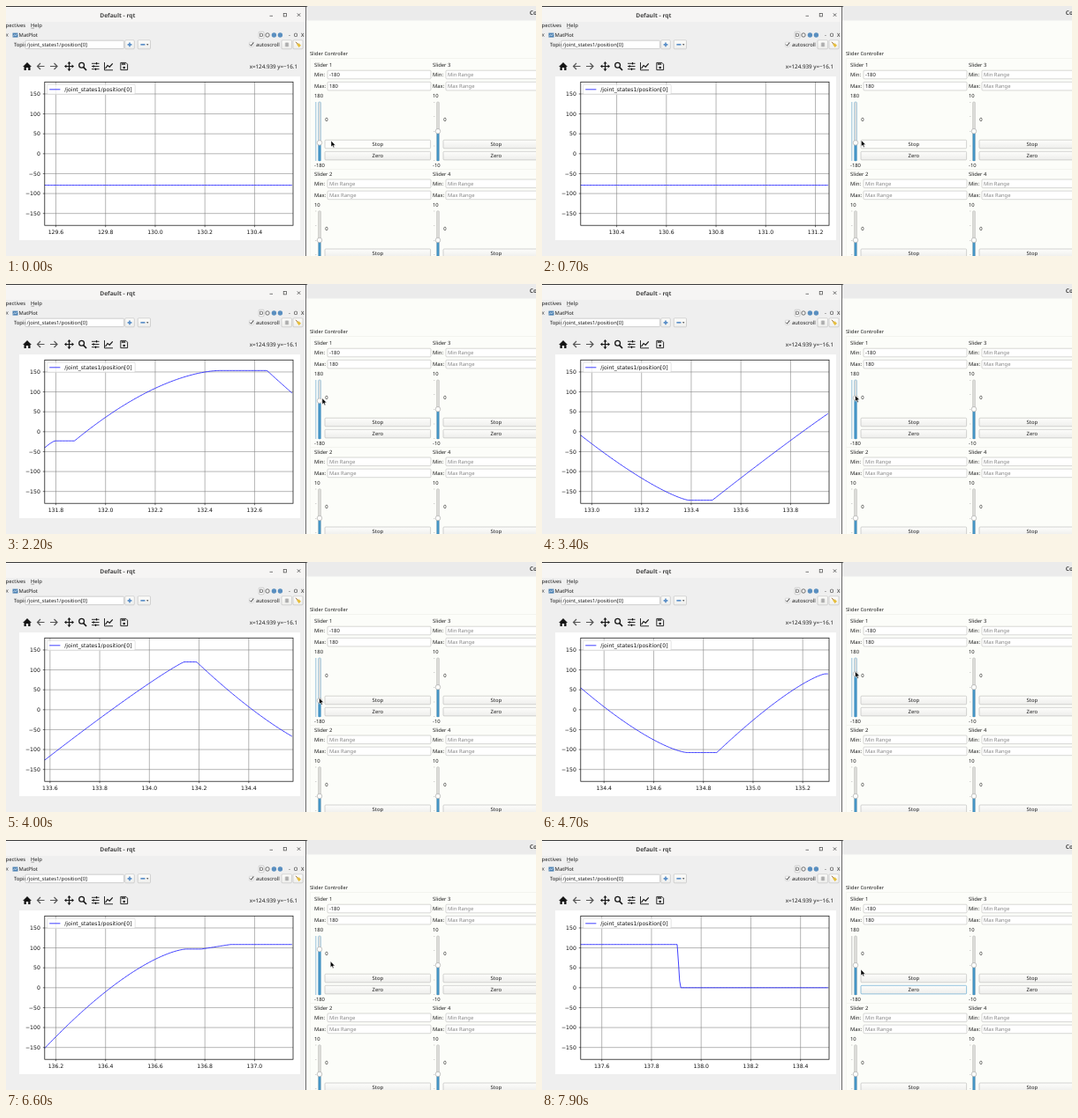
Write an HTML page that moves like this. It is 600x284 px and loops after 8000 ms.

```html
<!DOCTYPE html>
<html lang="en">
<head>
<meta charset="utf-8">
<title>Joint slider plot</title>
<style>
html, body { margin: 0; width: 100%; height: 100%; overflow: hidden; background: #efefef; }
svg { display: block; width: 600px; height: 284px; }
text { font: 5.85px "Noto Sans", "Open Sans", sans-serif; fill: #1c1c1c; text-rendering: geometricPrecision; white-space: pre; }
text.plot { font: 6.15px "DejaVu Sans", sans-serif; fill: #111; }
text.hint { fill: #858585; }
text.title { font-weight: 700; font-size: 6.6px; fill: #444; }
</style>
</head>
<body>
<svg id="stage" viewBox="0 0 600 284" xmlns="http://www.w3.org/2000/svg"></svg>
<script>
const stage = document.getElementById("stage");
const LOOP = 8000, STEP = 100;
const plot = { left: 43.8, right: 325, top: 86.3, bottom: 249.2, zero: 167.8, perUnit: 0.4525, perSecond: 281.2 };
const START = 130.555;      // plot time at the right edge when the loop begins
const LAG = 0.07;           // the plot trails the slider by this many seconds
const GRAB = 1, RELEASE = 6.3, PRESS_ZERO = 7.3;
const BLUE = "#1f1fff", GRID = "#858585", SLIDER = "#4595c6";

// Slider strokes in plot time; the position holds between them
const REST = -79;
const strokes = [
  { from: 131.693, to: 131.797, value: -23, ease: 1.3 },
  { from: 131.875, to: 132.46, value: 153.5, ease: 1.7 },
  { from: 132.65, to: 133.39, value: -172, ease: 1.3 },
  { from: 133.485, to: 134.14, value: 120, ease: 1.1 },
  { from: 134.19, to: 134.733, value: -107.5, ease: 1.4 },
  { from: 134.854, to: 135.29, value: 90, ease: 1.3 },
  { from: 135.42, to: 136.03, value: -172, ease: 1.2 },
  { from: 136.125, to: 136.725, value: 97, ease: 1.5 },
  { from: 136.786, to: 136.903, value: 108.5, ease: 1 },
  { from: 137.904, to: 137.915, value: 0, ease: 1 }
];
const drift = [[0, 0], [3.4, 0], [4.7, .051], [6.6, 0], [7.9, .06]];
const mouse = [
  [0, 368, 153], [.4, 368, 153], [.9, 357, 152], [2.2, 358, 128], [2.8, 354.5, 128], [RELEASE, 354.5, 121],
  [6.6, 367.3, 137.7], [7.1, 372, 169], [7.5, 372, 169], [7.9, 361, 147]
];

function position(time) {
  let value = REST;
  for (const s of strokes) {
    if (time <= s.from) break;
    const u = Math.min(1, (time - s.from) / (s.to - s.from));
    value += (s.value - value) * (1 - (1 - u) ** s.ease);
  }
  return value;
}

function along(keys, t, column = 1) {
  const i = keys.findIndex(key => key[0] >= t);
  if (i < 1) return keys[i < 0 ? keys.length - 1 : 0][column];
  const a = keys[i - 1], b = keys[i];
  return a[column] + (b[column] - a[column]) * (t - a[0]) / (b[0] - a[0]);
}

// Markup helpers
const attrs = o => Object.entries(o).map(([k, v]) => ` ${k}="${v}"`).join("");
const rect = (x, y, width, height, fill, more = {}) => `<rect${attrs({ x, y, width, height, fill, ...more })}/>`;
const path = (d, stroke, more = {}) => `<path${attrs({ d, fill: "none", stroke, "stroke-width": 1, ...more })}/>`;
const shape = (d, fill) => path(d, "none", { fill });
const circle = (cx, cy, r, fill, more = {}) => `<circle${attrs({ cx, cy, r, fill, ...more })}/>`;
const text = (x, y, s, more = {}) => `<text${attrs({ x, y, ...more })}>${s}</text>`;
const middle = { "text-anchor": "middle" }, end = { "text-anchor": "end" };
const thin = { "stroke-width": .6 };
const outlined = (stroke, rx = 1) => ({ stroke, rx, "stroke-width": .6 });

const field = (x, y, s, cls) =>
  rect(x, y, 117, 9.6, "#fff", outlined("#bdbdba")) + text(x + 1.9, y + 6.9, s, { class: cls });
const button = (x, y, s, id) =>
  rect(x, y, 119.6, 9.6, "url(#face)", { ...outlined("#b8b8b5"), id }) + text(x + 59.8, y + 6.9, s, middle);

function sliderPanel(n, x, y, limit, filled) {
  const gx = x + 6, gy = y + 47, cls = filled ? "" : "hint";
  return text(x, y + 7, "Slider " + n)
    + text(x, y + 18.3, "Min:") + text(x, y + 31.3, "Max:")
    + field(x + 15, y + 11.2, filled ? "-" + limit : "Min Range", cls)
    + field(x + 15, y + 24.3, filled ? limit : "Max Range", cls)
    + text(x, y + 41.9, limit) + text(x, y + 120.9, "-" + limit) + text(x + 12.3, y + 69.2, "0")
    + path(`M${gx - 4.3} ${gy}v67`, "#adadad", { "stroke-width": 1.5, "stroke-dasharray": filled ? ".6 .6" : ".5 16.1", id: "ticks" + n })
    + rect(gx - 1.4, gy, 2.8, 67, "#dededb", { ...outlined("#bcbcb9"), id: "groove" + n })
    + rect(gx - 1.4, gy + 33, 2.8, 34, SLIDER, { id: "fill" + n })
    + circle(gx, gy + 33.2, 2.8, "#fcfcfa", { stroke: "#a3a3a3", "stroke-width": .6, id: "knob" + n })
    + button(x + 12, y + 90.2, "Stop", "stop" + n) + button(x + 12, y + 103.3, "Zero", "zero" + n);
}

function toolbar() {
  const ink = "#151515", pen = { "stroke-width": 1.2 };
  return shape("M19 69L24 64L29 69H27.5V73H25.2V70H22.8V73H20.5V69Z", ink)
    + path("M43.5 68.5H35.5M39 65L35.5 68.5L39 72", "#555", pen)
    + path("M50 68.5H58M54.5 65L58 68.5L54.5 72", "#555", pen)
    + path("M67.5 68.5H75.5M71.5 64.5V72.5", ink, pen)
    + shape("M66 68.5l2.4-2v4zM77 68.5l-2.4-2v4zM71.5 63l-2 2.4h4zM71.5 74l-2-2.4h4z", ink)
    + circle(85.6, 67.2, 2.9, "none", { stroke: ink, "stroke-width": 1.3 }) + path("M87.7 69.5L91 73", ink, { "stroke-width": 1.7 })
    + path("M97 65.3H105.5M97 68.5H105.5M97 71.7H105.5", ink, { "stroke-width": .9 })
    + path("M102.5 64V66.6M99.2 67.2V69.8M101.5 70.4V73", ink, pen)
    + path("M111.5 64V72.8H121", ink, { "stroke-width": .9 }) + path("M112.5 71L115 67.5L117.3 69.2L120.7 65.3", ink, pen)
    + path("M129.8 64.4H135.8L137.6 66.2V72.6H129.8Z", ink, { "stroke-width": .9 })
    + path("M130.8 66H135.2", ink, { "stroke-width": 1.4 }) + circle(133.7, 70, 1.3, ink);
}

function plotWindow() {
  const dark = "#444";
  let s = rect(0, 0, 340, 284, "#efefef") + rect(0, 0, 340, 18, "#f6f5f4") + rect(0, 0, 340, 1, "#3a3a3a")
    + text(126.3, 12.6, "Default - rqt", { class: "title", ...middle })
    + path("M298.5 11.3H302", dark, { "stroke-width": .7 }) + rect(314.2, 8.5, 3.4, 3.4, "none", { stroke: dark, "stroke-width": .7 })
    + path("M329.8 8.4L333.2 11.8M333.2 8.4L329.8 11.8", dark, { "stroke-width": .8 })
    + text(-.4, 24.2, "pectives") + text(28, 24.2, "Help") + path("M28.4 25.2H32", "#333", { "stroke-width": .4 });
  s += path("M0 31.3L2.4 34.8M2.4 31.3L0 34.8", dark, thin)
    + rect(7.5, 30.6, 6, 5, "#4c82b4") + path("M8.2 34.4L9.8 32.5L11 33.8L12.8 31.6", "#fff", { "stroke-width": .7 })
    + text(14.6, 35.2, "MatPlot")
    + rect(286.2, 29.2, 5.8, 7.6, "#f7f7f7", outlined("#b4b4b4")) + text(289.1, 35, "D", middle)
    + circle(296, 33, 2.2, "none", { stroke: "#666", "stroke-width": .9 })
    + circle(303.4, 33, 2.7, "#5a8fc0") + circle(310.4, 33, 2.7, "#5a8fc0")
    + text(320, 35.2, "-") + text(325.7, 35.2, "O") + text(334, 35.2, "X");
  s += text(9, 46, "Topic") + rect(22, 39.2, 111.5, 9.4, "#fff", outlined("#b4b4b4"))
    + text(23.6, 46, "/joint_states1/position[0]");
  [[134.8, 10.5], [149.2, 14.3], [312, 11.4], [325, 11]].forEach(([x, w]) => s += rect(x, 38.8, w, 10, "url(#face)", outlined("#bababa")));
  s += path("M137.6 43.8H142.4M140 41.4V46.2", "#5b8fc8", { "stroke-width": 1.7 })
    + path("M152.4 43.8H157.4", "#5b8fc8", { "stroke-width": 1.7 }) + shape("M159 43.2h2.4l-1.2 1.5z", "#333")
    + rect(275.4, 41.2, 5, 5, "#fff", outlined("#c4c4c4", .5)) + path("M276.2 43.6L277.6 45.2L280 41.5", "#222", { "stroke-width": .9 })
    + text(282.9, 46, "autoscroll")
    + rect(315.8, 41.6, 4.4, 4.6, "#bcbcbc") + path("M318 41.6V46.2", "#999", { "stroke-width": .8 })
    + path("M328 40.8L330.3 43.2", "#9a6a2c") + shape("M329 43.6L331.4 42.2L334 44.8L331.6 47Z", "#e5bd3c");
  s += toolbar() + text(330, 70.8, "x=124.939 y=−16.1", { ...end, style: "font-size:6.25px" });

  const { left, right, top, bottom, zero, perUnit } = plot;
  s += rect(15, 80, 318, 186, "#fff");
  for (let v = -150; v <= 150; v += 50) {
    const y = zero - v * perUnit;
    s += path(`M${left} ${y}H${right}`, GRID, thin) + path(`M${left - 2} ${y}H${left}`, "#111", thin)
      + text(38.8, y + 2.3, String(v).replace("-", "−"), { class: "plot", ...end });
  }
  return s + `<g id="times"></g>` + path("", BLUE, { id: "curve", "stroke-width": .85, "stroke-linejoin": "round" })
    + rect(left, top, right - left, bottom - top, "none", { stroke: "#111", "stroke-width": .75 })
    + rect(46.6, 89.2, 99.6, 11.2, "#fff", { ...outlined("#d4d4d4", 1.3), "fill-opacity": .8 })
    + path("M49.2 94.8H61.4", BLUE, { "stroke-width": .85 })
    + text(66.2, 96.9, "/joint_states1/position[0]", { class: "plot" });
}

function sliderWindow() {
  let s = rect(339.2, 0, 6, 284, "#4a4a4a") + rect(340, 0, 264, 288, "#fcfdf9", { rx: 3 })
    + shape("M340 16.5V3Q340 0 343 0H600V16.5Z", "#ebebeb")
    + text(592.8, 10.3, "Co", { class: "title" })
    + text(344, 55.9, "Slider Controller", { style: "font-size:5.65px" })
    + path("M344.3 284V59.5H600M344.3 185.5H600", "#eeeeea", thin);
  for (let n = 1; n <= 4; n++)
    s += sliderPanel(n, n > 2 ? 483 : 349, n % 2 ? 62 : 185.8, n === 1 ? "180" : "10", n === 1);
  return s + path("M0 0V7L1.6 5.6L2.7 8L3.8 7.5L2.8 5.2H5Z", "#fff", { fill: "#000", "stroke-width": .5, id: "cursor" });
}

stage.innerHTML = `<defs><linearGradient id="face" x2="0" y2="1">
  <stop stop-color="#fdfdfb"/><stop offset="1" stop-color="#eeeeec"/></linearGradient></defs>`
  + plotWindow() + sliderWindow();

const part = id => document.getElementById(id);
const set = (id, values) => { for (const k in values) part(id).setAttribute(k, values[k]); };

function drawPlot(now) {
  const { left, right, top, bottom, zero, perUnit, perSecond } = plot;
  const points = [];
  for (let x = left; x <= right; x += 1.4) {
    const y = zero - position(now - (right - x) / perSecond) * perUnit;
    points.push(`${x.toFixed(2)} ${y.toFixed(2)}`);
  }
  set("curve", { d: "M" + points.join("L") });

  let marks = "";
  for (let n = Math.ceil((now - 1) * 5); n <= now * 5; n++) {
    const x = (right + (n / 5 - now) * perSecond).toFixed(2);
    marks += path(`M${x} ${top}V${bottom}`, GRID, thin) + path(`M${x} ${bottom}v2`, "#111", thin)
      + text(x, 259, (n / 5).toFixed(1), { class: "plot", ...middle });
  }
  part("times").innerHTML = marks;
}

function render(ms) {
  const t = Math.floor(ms % LOOP / STEP) * STEP / 1000;
  const now = START + t + along(drift, t);
  drawPlot(now);

  const knobY = 142.2 - position(now + LAG) / 6;
  set("knob1", { cy: knobY });
  set("fill1", { y: knobY, height: 176 - knobY });

  const dragging = t >= GRAB && t <= RELEASE;
  const x = along(mouse, t), y = dragging ? knobY - 3 : along(mouse, t, 2);
  set("cursor", { transform: `translate(${x.toFixed(2)} ${y.toFixed(2)})` });

  const zeroFocused = t >= PRESS_ZERO;
  const face = from => x >= 361 && y >= from && y <= from + 9.6 ? "#fdfdfb" : "url(#face)";
  set("stop1", { fill: face(152.2) });
  set("zero1", { fill: face(165.3), stroke: zeroFocused ? "#4d9ccb" : "#b8b8b5" });
  set("ticks1", { stroke: zeroFocused ? "#adadad" : "#6fa9d0" });
  set("groove1", { stroke: zeroFocused ? "#bcbcb9" : "#7db4d6" });
}

const begin = performance.now();
function tick() {
  render(performance.now() - begin);
  requestAnimationFrame(tick);
}
tick();
</script>
</body>
</html>
```
